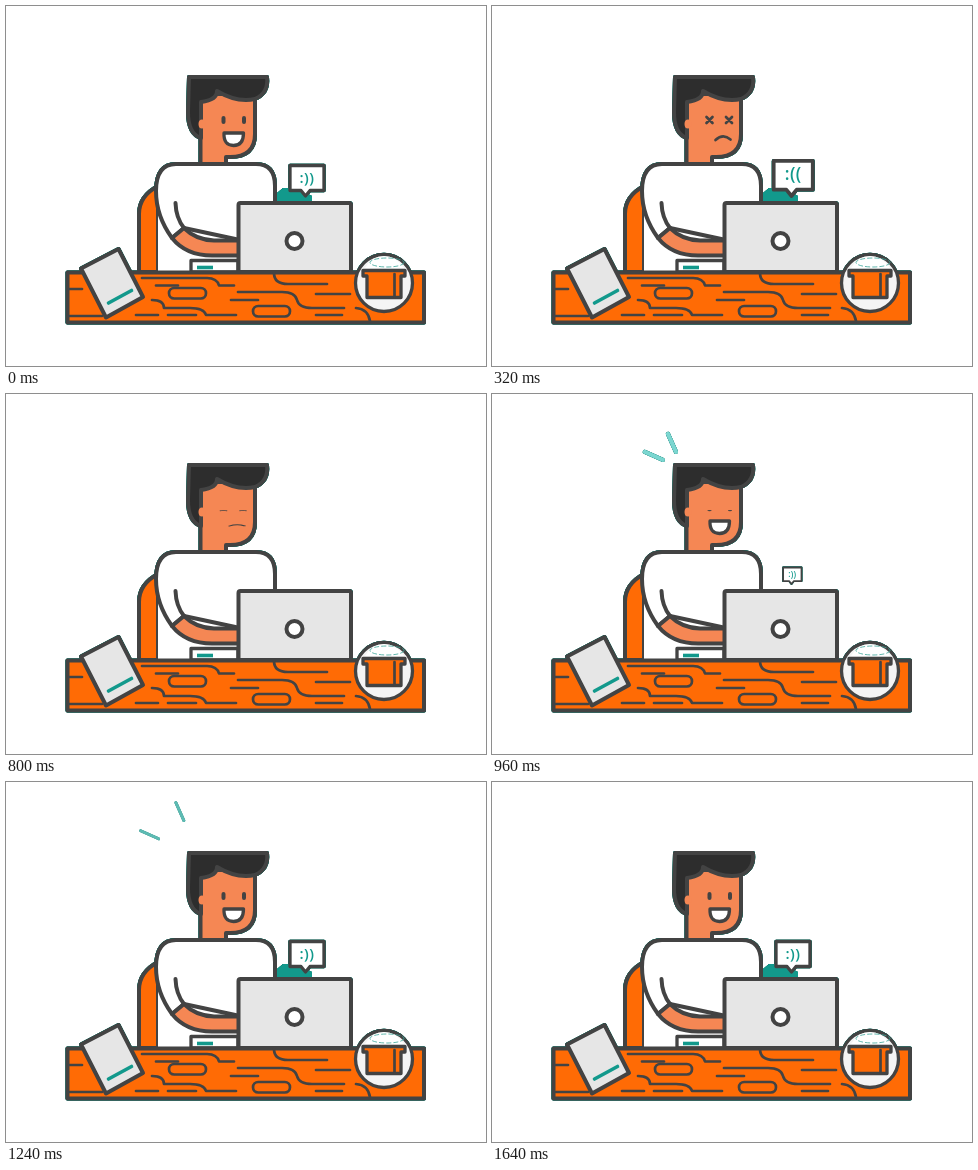
An HTML page that plays this animation: 480 by 360 pixels, repeating every 1680 ms.

```html
<!DOCTYPE html>
<html lang="en">
<head>
<meta charset="utf-8">
<title>Mood at the desk</title>
<style>
  html, body { margin: 0; width: 100%; height: 100%; overflow: hidden; background: #fff; }
  svg { display: block; width: 480px; height: 360px; }
  #scene { filter: drop-shadow(0 0 .6px #0d6f63) drop-shadow(0 0 .5px #128475); }
  .ink { stroke: #434343; stroke-width: 4; stroke-linejoin: round; stroke-linecap: round; }
  .mid { stroke-width: 3.3; }
  .thin { stroke-width: 2.7; }
  .line { fill: none; }
  .skin { fill: #f58754; }
  .orange { fill: #ff6b05; }
  .grey { fill: #e6e6e6; }
  .white { fill: #fff; }
  .teal { stroke: #12998c; stroke-width: 3.6; }
  text { font: 600 15px "Open Sans", sans-serif; letter-spacing: .4px; fill: #12998c; text-anchor: middle; }
</style>
</head>
<body>
<svg viewBox="0 0 480 360">
  <g id="scene">
    <g id="sparks" fill="none" stroke="#85e0dc" stroke-linecap="round">
      <path d="M153 58L171 66"/>
      <path d="M176 40L184 58"/>
    </g>

    <path class="ink orange" d="M133 266V208Q133 190 152 180V266Z"/>
    <path class="white" d="M152 190H232V266H152Z"/>

    <!-- head -->
    <path class="ink skin" d="M194.500 157V88H249V128Q249 151 224 151H220V157"/>
    <path class="ink" fill="#2d2d2d" d="M183 71H261Q263 87 249 93Q231 97 211 85Q211 94 195 96V132Q182 128 182 106Z"/>
    <ellipse class="skin" cx="196" cy="118" rx="3.500" ry="4.500"/>

    <g id="eyes">
      <path id="openEyes" class="ink line" d="M217.500 112v4M238 112v4"/>
      <path id="crossEyes" class="ink thin line" d="M214.500 111l6 6m0-6l-6 6M234 111l6 6m0-6l-6 6"/>
    </g>
    <g id="mouth">
      <path id="smile" class="ink mid white" d="M218 127H237.500Q237.500 139.500 227.500 139.500T218 127Z"/>
      <path id="frown" class="ink thin line" d="M223.500 134Q231 127 238.500 133.500"/>
    </g>

    <!-- body -->
    <path class="ink white" d="M234 264V200H269V180Q269 158 250 158H170Q150 158 150 185Q150 210 166 232L178 222L234 234"/>
    <path class="white" d="M168 233H232V264H168Z"/>
    <path class="ink skin" d="M166 232Q180 249.500 206 249.500H234V234.500H208Q190 234 178 222Z"/>
    <path class="ink line" d="M169.500 197Q170 212 178 222"/>
    <path class="ink mid white" d="M185 266V254.500H232V266Z"/>
    <path class="teal" d="M191 261.500H207"/>

    <path id="shade" fill="#12998c" d="M271 196V187L277 182H290L306 190V196Z"/>
    <g id="bubble">
      <path class="ink mid white" d="M284 159.500H318V184.500H304L299.500 190L295 184.500H284Z"/>
      <text id="emote" x="301" y="176.500"></text>
    </g>

    <rect class="ink grey" x="232.500" y="197" width="112.500" height="69" rx="2"/>
    <circle class="ink white" cx="288.500" cy="235" r="8"/>

    <!-- desk -->
    <rect class="ink orange" x="61.500" y="266.500" width="356.500" height="50"/>
    <path class="ink thin line" d="M136 272H201Q211 272 213 279.500H228M146 294Q158 294 158 302H184Q198 302 200 309H230
      M268 267Q268 278 282 278H321M232 286H276Q289 286 291 294T306 302H338M350 302Q362 303 364 315
      M63 283H76M63 310H96M150 279.500H172M225 294H252M310 288H344M130 309H152M162 309H190M310 309H336"/>
    <rect id="knot" class="ink thin line" x="163" y="282" width="37" height="10.500" rx="5.200"/>
    <use href="#knot" x="84" y="18"/>

    <path class="ink grey" d="M75 262.500L112.500 243L137 291L100 311.500Z"/>
    <path class="teal" stroke-linecap="round" d="M102.500 297L125.500 284.500"/>

    <!-- cup -->
    <circle class="ink mid" fill="#f4f4f4" cx="378" cy="277" r="28.500"/>
    <path class="white" d="M359 262Q366 250 378 250T398 262Z"/>
    <path class="ink mid orange" d="M357 264.500H399V270H395V291.500H361V270H357Z"/>
    <path class="ink thin line" d="M388.500 268V290"/>
    <ellipse class="line" stroke="#3aa598" stroke-width=".8" stroke-dasharray="5 2" cx="381" cy="256.500" rx="17" ry="4.500"/>
  </g>
</svg>
<script>
  const LOOP = 1680, STEP = 40;
  const $ = id => document.getElementById(id);
  const sparks = [...$("sparks").children];
  const clamp = v => Math.max(0, Math.min(1, v));

  // 0 between a and b, rising to 1 within `fade` ms on either side
  const gap = (t, a, b, fade) => clamp(Math.max(a - t, t - b) / fade);
  const backOut = u => 1 + 3.2 * (u - 1) ** 3 + 2.2 * (u - 1) ** 2;
  const pop = (t, hide, appear) =>
    t < appear ? 1 - clamp((t - hide) / 100) : backOut(clamp((t - appear) / 240));

  function scale(id, x, y, sx, sy) {
    $(id).setAttribute("transform", `translate(${x} ${y}) scale(${sx} ${sy}) translate(${-x} ${-y})`);
  }

  function show(id, on) { $(id).style.display = on ? "" : "none"; }

  function draw(t) {
    const sad = t >= 180 && t < 820;
    show("openEyes", !sad);
    show("smile", !sad);
    show("crossEyes", sad);
    show("frown", sad);
    $("emote").textContent = sad ? ":((" : ":))";

    const lids = Math.min(gap(t, 160, 200, 90), gap(t, 700, 945, 100));
    const lips = Math.min(gap(t, 180, 180, 60), gap(t, 820, 820, 60));
    scale("eyes", 228, 117, 1, Math.max(.12, lids));
    scale("mouth", 229, 131, 1, Math.max(.2, lips));

    const size = t < 640 ? pop(t, 80, 180) : pop(t, 660, 930);
    scale("bubble", 299.5, 190, size, size);
    show("bubble", size > 0);
    show("shade", size > .8);

    const u = clamp((t - 880) / 480);
    const out = 1.12 - 1.6 * (1 - u) ** 2;
    sparks[0].setAttribute("transform", `translate(${-18 * out} ${-9 * out})`);
    sparks[1].setAttribute("transform", `translate(${-6 * out} ${-19 * out})`);
    $("sparks").setAttribute("stroke-width", 4.3 * Math.sqrt(1 - u * u));
    $("sparks").setAttribute("opacity", 1 - .5 * u);
    show("sparks", u > 0 && u < 1);
  }

  const start = performance.now();
  function tick() {
    const t = (performance.now() - start) % LOOP;
    draw(Math.floor(t / STEP) * STEP);
    requestAnimationFrame(tick);
  }
  tick();
</script>
</body>
</html>
```
